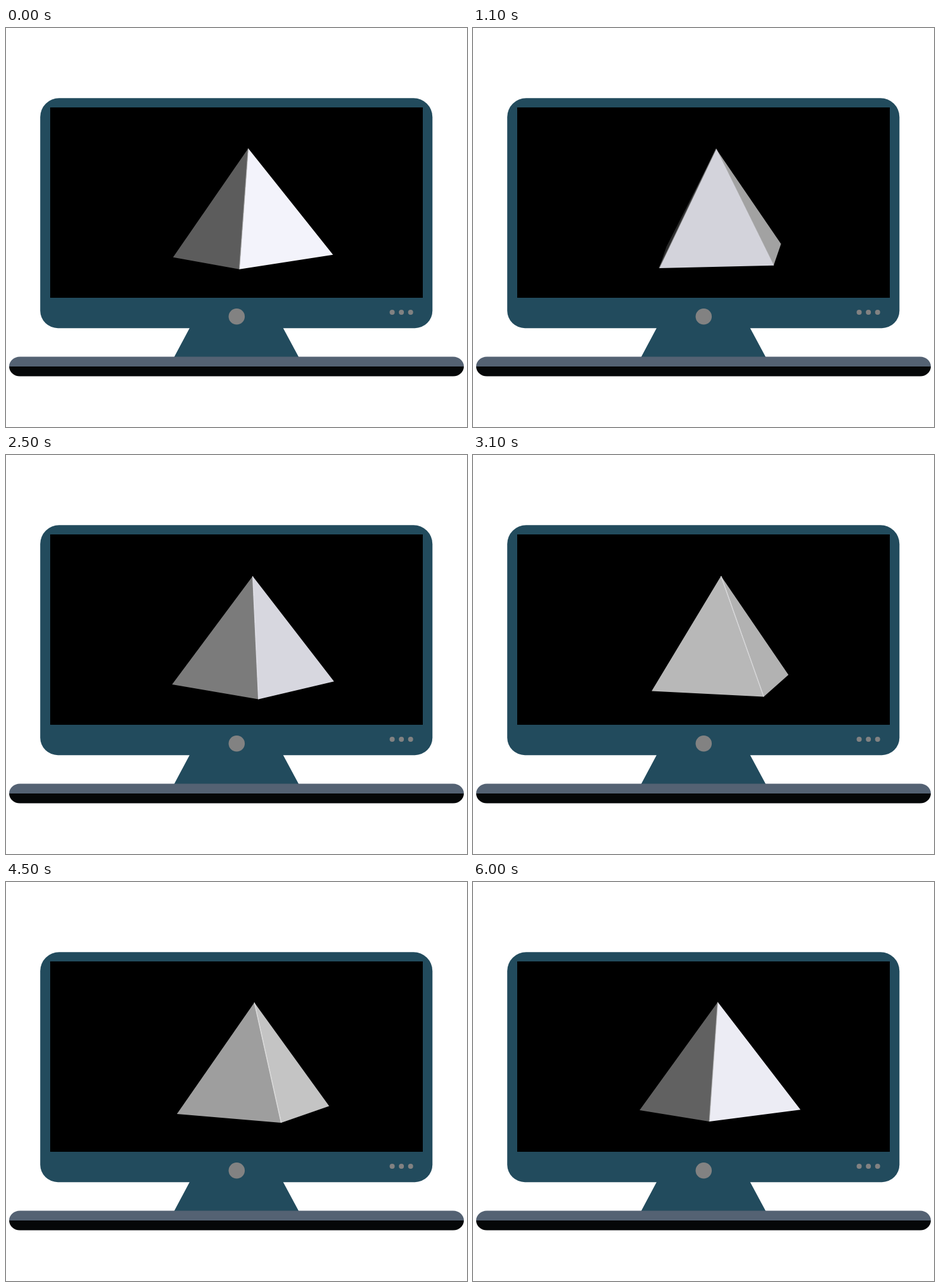
These frames come from a looping animation (730x633 px, 6.1 s). An HTML page with a canvas:

```html
<!DOCTYPE html>
<html lang="en">
<head>
<meta charset="utf-8">
<title>Rotating pyramid</title>
<style>
  html, body { margin: 0; width: 100%; height: 100%; overflow: hidden; background: #fff; }
  canvas { display: block; }
</style>
</head>
<body>
<canvas id="stage" width="730" height="633"></canvas>
<script>
const ctx = document.getElementById('stage').getContext('2d');
const STEP_MS = 100, STEPS = 61;
const CENTER_X = 391.2, CENTER_Y = 361.7, RADIUS = 128.5;
const RAD = Math.PI / 180;

// Cosine wave over steps, with its crest at the given step
const wave = (step, crest, period) => Math.cos(2 * Math.PI * (step - crest) / period);

// Steady turn in degrees with a slow sway in its speed
const turnAt = step => 4.636 * step - 14.9 - 7.5 * wave(step, 27, 43);

// Grey for a surface facing the given direction: diffuse light plus a highlight
function shade(degrees) {
  const facing = ((degrees + 180) % 360 + 360) % 360 - 180;
  const diffuse = Math.max(42, 84 + 134 * Math.cos((facing - 32) * RAD));
  const highlight = 80 * Math.exp(-(((facing - 17) / 17) ** 2));
  const level = Math.min(255, Math.round(diffuse + highlight));
  return `rgb(${level},${level},${level > 205 ? level + 8 : level})`;
}

function polygon(points, fill) {
  ctx.beginPath();
  points.forEach(p => ctx.lineTo(...p));
  ctx.closePath();
  ctx.fillStyle = fill;
  ctx.fill();
}

function box(x, y, w, h, radii, fill) {
  ctx.beginPath();
  ctx.roundRect(x, y, w, h, radii);
  ctx.fillStyle = fill;
  ctx.fill();
}

function dot(x, y, radius) {
  ctx.beginPath();
  ctx.arc(x, y, radius, 0, 2 * Math.PI);
  ctx.fillStyle = '#828282';
  ctx.fill();
}

function drawMonitor() {
  const casing = '#224b5d', barEnd = { x: 17, y: 15.5 };
  ctx.fillStyle = '#fff';
  ctx.fillRect(0, 0, 730, 633);
  polygon([[291.3, 475], [438.3, 475], [463.5, 522], [266.3, 522]], casing);
  box(54.2, 111.2, 621.1, 365, [30, 30, 28, 28], casing);
  box(70, 126, 590, 302, 0, '#000');
  dot(365.3, 457.7, 12.8);
  for (let i = 0; i < 3; i++) dot(611.5 + 14.6 * i, 451, 4);
  box(5, 521.5, 720, 15.5, [barEnd, barEnd, 0, 0], '#546273');
  box(5, 537, 720, 15.5, [0, 0, barEnd, barEnd], '#050708');
}

function drawPyramid(step) {
  const turn = turnAt(step);
  // The axis leans and slowly precesses
  const lean = wave(step, 2, 74), nod = wave(step, 23.5, 74);
  const depth = 22.1 + 3.9 * nod, slope = -2 - 3.6 * lean;
  const apex = [CENTER_X - 2.5 - 5.2 * lean, 191.4 + 0.8 * nod];

  const corners = [0, 90, 180, 270].map(offset => {
    const a = (turn + offset) * RAD;
    return [CENTER_X + RADIUS * Math.sin(a),
      CENTER_Y + depth * Math.cos(a) + slope * Math.sin(a)];
  });

  const visible = corners.map((p, i) => {
    const q = corners[(i + 1) % 4];
    return (p[0] - apex[0]) * (q[1] - apex[1]) < (p[1] - apex[1]) * (q[0] - apex[0]);
  });

  corners.forEach((p, i) => {
    if (visible[i]) polygon([apex, p, corners[(i + 1) % 4]], shade(turn + 45 + 90 * i));
  });

  corners.forEach((p, i) => {
    if (!visible[i] || !visible[(i + 3) % 4]) return;
    ctx.beginPath();
    ctx.moveTo(...apex);
    ctx.lineTo(...p);
    ctx.lineWidth = 1.3;
    ctx.strokeStyle = shade(turn + 90 * i);
    ctx.globalAlpha = 0.7;
    ctx.stroke();
    ctx.globalAlpha = 1;
  });
}

const start = performance.now();
function render() {
  const elapsed = performance.now() - start;
  drawMonitor();
  drawPyramid(Math.floor(elapsed / STEP_MS) % STEPS);
  requestAnimationFrame(render);
}
render();
</script>
</body>
</html>
```
